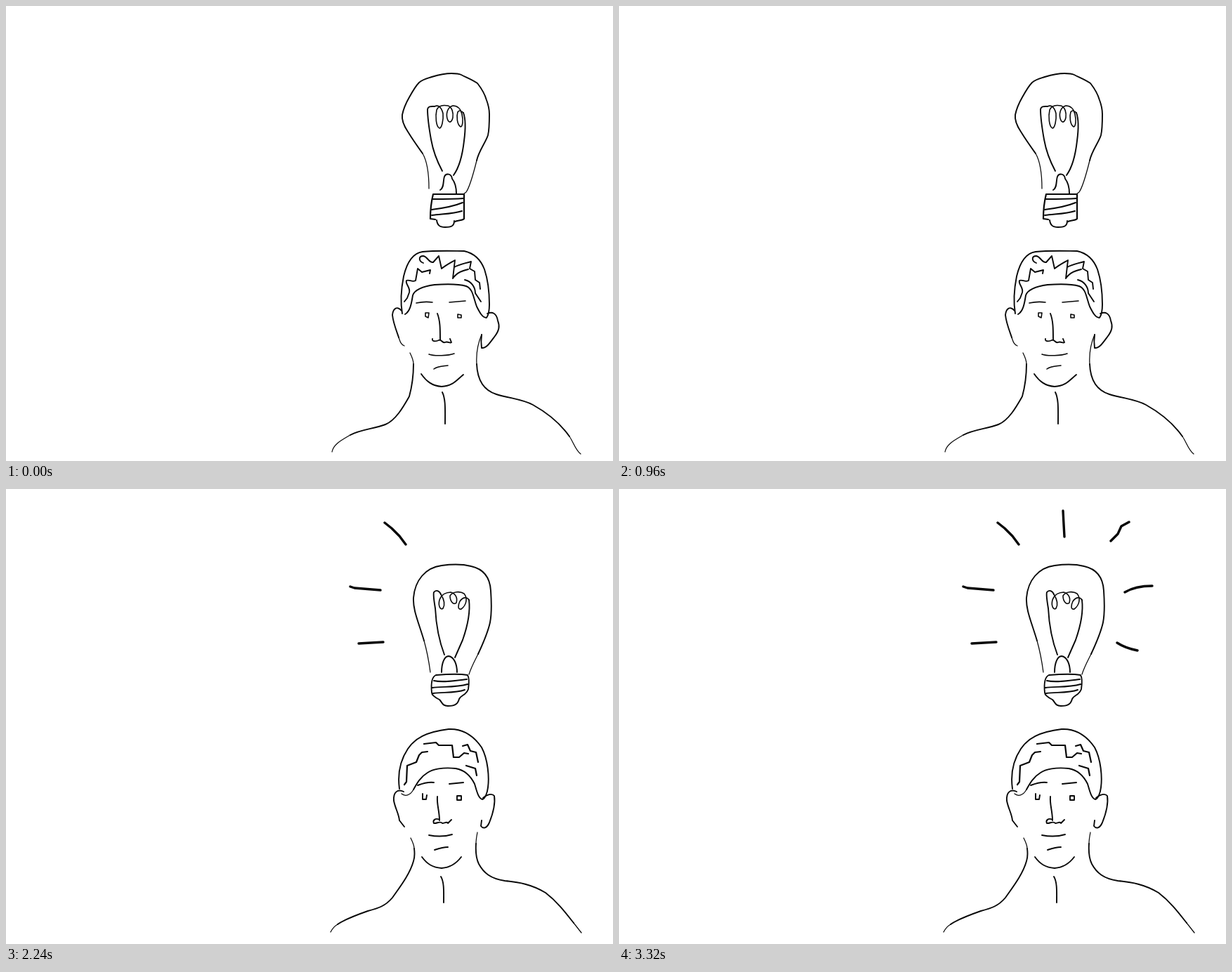
Animation of 864 by 648 pixels, one loop 3360 ms. Source, as an HTML page:

```html
<!DOCTYPE html>
<html lang="en">
<head>
<meta charset="utf-8">
<title>Bright idea</title>
<style>
  html, body { margin: 0; width: 100%; height: 100%; overflow: hidden; background: #fff; }
  svg { display: block; width: 864px; height: 648px; }
  path { fill: none; stroke: #080808; stroke-width: 1.9; stroke-linecap: round; stroke-linejoin: round; }
  .thin { stroke-width: 1.25; }
  .mid { stroke-width: 1.6; }
  .bold { stroke-width: 2.2; }
  .rays path { stroke-width: 3.4; animation: 3360ms step-end infinite; }

  /* three drawings take turns, 160 ms each */
  .pose { opacity: 0; animation: turn 480ms step-end infinite; }
  .second { animation-delay: -320ms; }
  .third { animation-delay: -160ms; }
  @keyframes turn { 0% { opacity: 1; } 33.333% { opacity: 0; } }

  /* rays switch on one after another and stay until the loop ends */
  .rays path:nth-child(1) { animation-name: ray1; }
  .rays path:nth-child(2) { animation-name: ray2; }
  .rays path:nth-child(3) { animation-name: ray3; }
  .rays path:nth-child(4) { animation-name: ray4; }
  .rays path:nth-child(5) { animation-name: ray5; }
  .rays path:nth-child(6) { animation-name: ray6; }
  .rays path:nth-child(7) { animation-name: ray7; }
  @keyframes ray1 { 0% { opacity: 0; } 42.857% { opacity: 1; } }
  @keyframes ray2 { 0% { opacity: 0; } 52.381% { opacity: 1; } }
  @keyframes ray3 { 0% { opacity: 0; } 61.904% { opacity: 1; } }
  @keyframes ray4 { 0% { opacity: 0; } 70.238% { opacity: 1; } }
  @keyframes ray5 { 0% { opacity: 0; } 80.952% { opacity: 1; } }
  @keyframes ray6 { 0% { opacity: 0; } 90.476% { opacity: 1; } }
  @keyframes ray7 { 0% { opacity: 0; } 98.809% { opacity: 1; } }
</style>
</head>
<body>
<svg viewBox="0 0 864 648">
  <defs>
    <filter id="pencil" filterUnits="userSpaceOnUse" x="0" y="0" width="864" height="648" color-interpolation-filters="sRGB">
      <feTurbulence type="fractalNoise" baseFrequency=".16" numOctaves="2" seed="4"/>
      <feDisplacementMap in="SourceGraphic" scale="1.2" xChannelSelector="R" yChannelSelector="G"/>
    </filter>
  </defs>

  <g class="pose first"><g filter="url(#pencil)">
    <!-- bulb -->
    <path d="M593 210C588 203 580 192 572 179C566 170 563 163 564 155C566 145 570 137 574 130C579 121 583 114 588 109C594 104 600 103 606 101C616 98 626 96 634 96C640 96 644 96 648 98C656 102 664 105 671 110C678 119 682 127 684 134C687 142 688 148 688 154C688 165 688 176 686 184C683 194 673 206 670 220"/>
    <path class="thin" d="M593 210C600 222 602 240 602 260M670 220C666 236 660 258 655 265L651 268"/>
    <path d="M621 235C614 222 608 207 605 190C602 173 600 155 600 147C601 142 606 143 610 143"/>
    <path class="mid" d="M610 143C616 140 620 145 622 153C623 163 620 174 617 174C612 172 611 157 613 148C616 141 624 141 629 142C635 144 637 152 636 159C634 167 630 167 628 160C626 152 629 144 636 142C643 142 647 146 649 154C651 163 650 172 647 172C642 169 641 157 643 151C645 148 648 149 651 152"/>
    <path d="M651 152C654 160 654 177 652 192C650 210 645 230 637 241"/>
    <path d="M618 262C624 259 622 248 624 243C626 238 634 238 635 246C639 251 641 258 641 267"/>
    <path class="bold" d="M608 268L652 268L652 303C649 306 643 305 639 307M608 268C605 280 604 293 604 303L611 304"/>
    <path d="M607 275C622 275 638 275 651 274M606 290C622 288 638 285 650 280M606 298C622 296 637 296 649 292M613 305C614 312 617 315 625 315C633 315 638 314 638 306"/>
    <!-- head -->
    <path d="M564 438C561 420 563 400 566 385C570 368 578 352 593 350C612 348 640 349 652 349C666 352 676 362 681 375C686 390 688 410 688 425C688 432 687 440 684 444C678 444 674 436 670 428C665 415 665 403 655 399C645 396 625 396 610 397C596 399 582 403 579 412C577 425 575 435 568 439"/>
    <path d="M567 421L571 416L574 408C576 401 568 396 570 391C574 389 578 394 583 391L586 374L592 379L604 376L603 381M594 366C587 363 587 356 594 356C600 357 602 366 608 365L616 356L620 374C626 369 632 366 639 362L636 388C642 379 650 377 658 375M638 372C645 368 652 367 662 364L660 374L667 378L668 390L674 394L675 403M653 390C662 392 668 400 668 409L676 421"/>
    <path d="M563 434C557 427 551 430 550 440C551 451 556 463 559 472M685 438C692 435 698 437 700 448C703 456 702 462 696 470C690 478 684 488 677 487C676 480 676 475 677 468"/>
    <path class="thin" d="M559 472C561 478 562 482 567 484"/>
    <!-- face -->
    <path class="mid" d="M584 423C593 421 600 421 607 422M631 422L654 420M597 437L602 437L601 444L597 442ZM643 439L648 440L648 444L643 444ZM602 496C610 499 630 498 638 495M609 517C614 513 622 513 629 512"/>
    <path d="M614 438C618 448 618 460 618 475M607 474C606 478 612 478 616 476C620 474 621 481 625 479C629 477 632 481 634 479L632 474M591 524C598 534 606 541 620 542C636 541 640 534 651 525"/>
    <!-- shoulders -->
    <path d="M580 510C580 528 577 545 574 556C566 570 555 590 540 596C525 602 505 603 490 611M670 510C671 535 682 548 698 553C718 559 735 560 750 568C775 582 790 596 802 613M621 550C626 560 625 575 625 595"/>
    <path class="thin" d="M575 494C578 500 580 505 580 510M490 611C478 618 466 624 464 635M677 468C671 482 669 495 670 510M802 613C808 622 811 633 818 638"/>
  </g></g>

  <g class="pose second"><g filter="url(#pencil)">
    <!-- bulb -->
    <path d="M596 216C588 200 578 185 573 172C568 158 571 140 581 123C591 107 610 97 632 96C653 96 670 105 680 120C688 135 690 158 686 178C682 195 674 207 669 222"/>
    <path class="thin" d="M596 216C601 230 603 245 604 261M669 222C665 238 660 253 655 265"/>
    <path d="M622 236C614 217 609 192 606 172C604 157 603 149 606 146C610 143 614 146 616 150"/>
    <path class="mid" d="M616 150C621 158 622 168 618 172C613 172 612 160 615 151C619 144 627 142 632 146C638 152 639 163 635 164C630 164 628 154 633 147C639 142 647 144 650 150C653 158 651 170 647 171C642 169 643 157 648 152L655 154"/>
    <path d="M655 154C657 173 654 195 648 214L638 240"/>
    <path d="M619 262C622 252 622 240 629 238C636 240 641 252 641 264"/>
    <path d="M609 267C624 265 640 266 655 267C656 279 655 291 653 299C649 303 643 302 640 305M609 267C605 279 604 291 606 299L614 302M608 275C623 275 640 273 654 270M606 285C620 284 639 283 653 278M607 294C622 291 640 292 651 288M614 302C616 309 618 312 626 312C634 312 639 310 640 304"/>
    <!-- head -->
    <path d="M562 433C559 411 563 389 570 372C579 356 596 348 618 346C644 344 664 352 676 369C685 387 688 409 687 427C686 436 684 442 681 443C676 441 671 430 668 420C663 407 654 400 641 398C625 396 608 397 597 402C586 408 580 422 575 433C572 437 568 438 565 436"/>
    <path d="M567 422L571 414L571 393L583 390L587 376L602 376M592 363C599 357 605 364 613 362L619 364L622 372L636 364L637 384L650 371L661 366L662 375L669 378L671 393M653 392L667 398L673 412"/>
    <path d="M564 432C557 427 551 431 551 442C553 455 558 465 560 475L567 483M682 439C688 435 695 436 697 444C698 456 693 466 689 475C684 485 679 486 677 482"/>
    <!-- face -->
    <path class="mid" d="M585 423C593 420 602 419 608 420M631 421L653 419M595 436L600 436L600 443L595 442ZM643 438L648 438L648 444L643 443ZM602 494C611 497 627 497 637 493M609 515C616 513 622 511 629 511"/>
    <path d="M614 438C616 450 618 460 617 474M608 473C608 478 614 476 618 474C621 474 622 478 626 477C629 475 632 478 634 473M592 524C599 535 607 540 620 541C635 540 641 533 650 524"/>
    <!-- shoulders -->
    <path d="M580 512C581 531 574 548 564 565C553 582 544 594 526 599C511 603 500 606 487 612M669 510C670 533 679 548 701 555C721 559 741 561 759 571C781 585 794 603 806 618M620 551C625 560 624 575 624 592"/>
    <path class="thin" d="M576 496C579 502 580 507 580 512M487 612C476 617 467 623 462 632M674 477C670 488 669 499 669 510M806 618C810 624 814 629 818 633"/>
  </g></g>

  <g class="pose third"><g filter="url(#pencil)">
    <!-- bulb -->
    <path d="M595 216C587 189 579 172 580 155C582 130 597 112 620 109C635 107 650 107 662 110C680 114 689 126 690 145C691 160 692 175 689 190C686 204 679 220 672 235"/>
    <path class="thin" d="M595 216C599 230 602 246 604 261M672 235C667 245 662 254 659 264"/>
    <path d="M624 236C616 215 612 190 611 170C609 158 608 150 609 147C612 143 617 145 619 150"/>
    <path class="mid" d="M619 150C624 158 625 165 622 170C618 173 615 166 617 158C620 150 627 147 633 147C640 149 643 155 641 162C637 166 632 160 632 152C636 146 646 145 652 149C657 155 656 165 648 171C643 172 643 166 646 160C650 154 656 153 659 158"/>
    <path d="M659 158C661 174 657 195 650 215L639 240"/>
    <path d="M620 261C620 248 624 238 630 238C638 239 642 250 642 261"/>
    <path d="M612 265C625 264 645 263 657 265C660 270 659 278 658 285C655 294 648 293 645 299C643 308 636 309 629 309C621 309 621 304 617 300C611 297 606 294 606 290C605 280 605 268 612 265M609 273C622 276 640 273 656 271M607 283C620 281 640 283 657 278M608 291C622 289 640 291 653 286"/>
    <!-- head -->
    <path d="M560 427C557 405 562 385 572 370C582 355 598 346 630 342C650 341 666 352 677 368C686 385 688 410 686 425C685 433 682 441 678 442C672 440 670 430 667 420C661 408 652 400 640 398C622 396 607 399 600 404C590 410 585 419 580 428"/>
    <path class="thin" d="M580 428C575 437 568 438 563 434"/>
    <path class="bold" d="M567 421L570 417L571 394L584 389L588 379L592 375L600 374M595 363L612 361L616 365L635 365L637 382L645 382L652 376L658 377M650 366L657 364L661 373L669 375L672 389M655 394L668 398L670 408"/>
    <path d="M566 431C558 427 551 431 552 444C554 455 559 462 560 472L567 481M679 440C684 435 692 433 695 437C697 450 692 465 688 475C684 484 679 484 676 480L677 472"/>
    <!-- face -->
    <path d="M586 422C594 419 602 417 609 418M631 420L651 418M593 434L593 442L598 442L599 436M642 437L648 437L648 443L642 443ZM614 438C613 450 617 458 617 472M617 471C611 468 607 472 609 476C613 477 618 472 621 476C624 476 628 473 629 476L634 471M602 493C612 495 625 495 635 492M610 514C616 512 622 510 629 510M592 524C600 535 608 539 620 540C634 539 642 532 648 524"/>
    <!-- shoulders -->
    <path d="M581 512C582 520 582 524 580 530C575 548 562 565 550 582C540 594 530 597 515 601C495 608 482 613 472 620M669 505C668 520 670 528 673 534C680 547 690 555 710 558C730 560 748 563 768 575C785 588 797 604 808 618M619 552C624 560 623 575 623 589"/>
    <path class="thin" d="M576 497C579 503 581 507 581 512M472 620C467 623 464 627 462 631M671 489C670 494 669 500 669 505M808 618L819 632"/>
  </g></g>

  <g class="rays" filter="url(#pencil)">
    <path d="M502 220L537 218"/>
    <path d="M490 139L496 141L533 144"/>
    <path d="M539 48L549 56L560 67L569 79"/>
    <path d="M632 31L633 50L634 68"/>
    <path d="M726 47L715 53L710 64L700 74"/>
    <path d="M720 147C730 141 745 138 759 138"/>
    <path d="M709 219C718 225 728 228 738 230"/>
  </g>
</svg>
</body>
</html>
```
